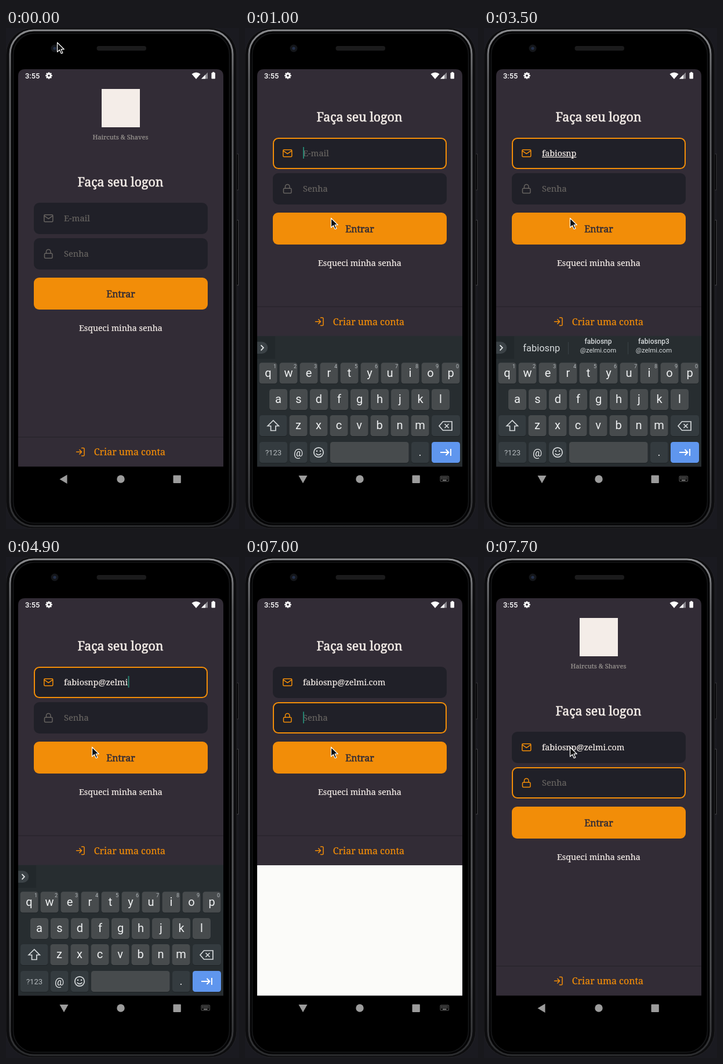
Write an HTML page that moves like this. It is 402x863 px and loops after 8 s.

```html
<!DOCTYPE html>
<html lang="pt-BR">
<head>
<meta charset="utf-8">
<title>Logon</title>
<style>
html, body { margin: 0; width: 100%; height: 100%; overflow: hidden; background: #1a1a20; }
svg { display: block; }
text { font-family: "Noto Serif", serif; fill: currentColor; color: #f4ede8; stroke: currentColor; stroke-width: .22px; white-space: pre; }
.sans, .sans text { font-family: Roboto, sans-serif; stroke: none; }
.mid { text-anchor: middle; }
.thick { stroke-width: .6px; }
.icon { fill: none; stroke-width: 2; stroke-linecap: round; stroke-linejoin: round; }
.hint { color: #666360; }
</style>
</head>
<body>
<svg id="stage" width="402" height="863" viewBox="0 0 402 863" xmlns="http://www.w3.org/2000/svg"></svg>
<script>
const LOOP = 8000;
const ORANGE = '#f28d08', GRAY = '#666360', FIELD = '#202028', BG = '#322c36';
const USER = 'fabiosnp', HOST = '@zelmi.com', MAIL = USER + HOST;

const rect = (x, y, w, h, rx, fill, more = '') =>
  `<rect x="${x}" y="${y}" width="${w}" height="${h}" rx="${rx}" fill="${fill}" ${more}/>`;
const text = (x, y, size, str, cls = '', more = '') =>
  `<text x="${x}" y="${y}" font-size="${size}" class="${cls}" ${more}>${str}</text>`;
const path = (d, more = '') => `<path d="${d}" ${more}/>`;
const icon = (id, cx, cy, color, body) =>
  `<g id="${id}" class="icon" stroke="${color}" transform="translate(${cx - 9} ${cy - 9}) scale(.75)">${body}</g>`;

function phone() {
  return `<defs>
    <linearGradient id="rim" x2="0" y2="1"><stop offset="0" stop-color="#8a8b8e"/><stop offset=".1" stop-color="#5c5d60"/><stop offset=".85" stop-color="#4c4d50"/><stop offset="1" stop-color="#2b2c2e"/></linearGradient>
    <clipPath id="screen"><path d="M21 755.5V83q0-12 12-12H363q12 0 12 12V755.5z"/></clipPath></defs>`
    + rect(0, 0, 402, 863, 0, '#1a1a20')
    + rect(396, 217, 5.5, 62, 1, '#0b0b0d', 'stroke="#3b3b3f"')
    + rect(396, 331, 5.5, 112, 1, '#0b0b0d', 'stroke="#4b4b4f"')
    + rect(0, 0, 398, 862, 46, '#0d0d0f', 'stroke="#222225"')
    + rect(7, 4, 384, 854, 41, '#050506', 'stroke="url(#rim)" stroke-width="3"')
    + rect(12.5, 9, 373, 844, 37, '#000', 'stroke="#17181a" stroke-width="1.5"')
    + '<circle cx="84" cy="35" r="6.5" fill="#14161a"/><circle cx="84" cy="35" r="2.6" fill="#232f49"/>'
    + rect(156.5, 31, 85.5, 8, 4, '#1b1b1c');
}

function statusBar() {
  const teeth = Array.from({ length: 8 }, (_, i) =>
    rect(72.7, 76.2, 2.6, 3, .4, '#fff', `transform="rotate(${i * 45} 74 82)"`)).join('');
  return text(33, 86.6, 12.8, '3:55', 'sans', 'font-weight="500" style="color:#fff"')
    + teeth + '<circle cx="74" cy="82" r="3.1" fill="none" stroke="#fff" stroke-width="2.5"/>'
    + path('M320.5 79.3Q328 73.5 335.5 79.3L328 88z', 'fill="#fff"')
    + path('M348 76.5V87.5H337z', 'fill="#8d8b91"')
    + path('M344 80.5V87.5H337z', 'fill="#fff"')
    + rect(354.5, 77, 6.5, 10.5, 1, '#fff') + rect(356.3, 75.8, 3, 2, 0, '#fff');
}

function form() {
  const mail = path('M4 4h16a2 2 0 0 1 2 2v12a2 2 0 0 1-2 2H4a2 2 0 0 1-2-2V6a2 2 0 0 1 2-2zM22 6l-10 7L2 6');
  const lock = path('M5 11h14a2 2 0 0 1 2 2v7a2 2 0 0 1-2 2H5a2 2 0 0 1-2-2v-7a2 2 0 0 1 2-2zM7 11V7a5 5 0 0 1 10 0v4');
  return '<g id="form">'
    + text(197.5, 273, 21.3, 'Faça seu logon', 'mid thick')
    + rect(49, 302, 298, 52, 8.5, FIELD, 'id="mailBox" stroke-width="2"')
    + icon('mailIcon', 73.3, 327.8, GRAY, mail)
    + text(100, 332.6, 14.6, 'E-mail', 'hint', 'id="mailHint"')
    + text(100, 332.6, 14.3, '', '', 'id="mail"')
    + rect(100, 334, 0, 1.1, 0, '#f4ede8', 'id="underline"')
    + rect(49, 363, 298, 52, 8.5, FIELD, 'id="passBox" stroke-width="2"')
    + icon('passIcon', 73.2, 389, GRAY, lock)
    + text(100, 394, 14.6, 'Senha', 'hint')
    + rect(100, 317, 2, 20, 0, '#25806f', 'id="caret"')
    + rect(48, 430, 300, 55, 9, ORANGE)
    + text(198, 463.6, 15.9, 'Entrar', 'mid thick', `style="color:${BG}"`)
    + text(197.8, 521.5, 14.2, 'Esqueci minha senha', 'mid')
    + '</g>';
}

function footer() {
  return '<g id="footer">' + rect(21, 704, 354, 1.2, 0, '#27232b')
    + icon('enter', 128.3, 730.3, ORANGE,
      path('M15 3h4a2 2 0 0 1 2 2v14a2 2 0 0 1-2 2h-4M10 17l5-5-5-5M15 12H3'))
    + text(151.8, 736, 15.95, 'Criar uma conta', '', `style="color:${ORANGE}"`) + '</g>';
}

function keyboard() {
  const KEY = '#474b4d', SPECIAL = '#343b3f', INK = 'style="color:#eef0f1"', DIM = 'style="color:#b4babd"';
  const rows = [['qwertyuiop', 40, 576.5], ['asdfghjkl', 57.5, 622], ['zxcvbnm', 92, 667]];
  const key = (x, y, w, fill) => rect(x, y + 1, w, 36, 4.5, '#1e2326') + rect(x, y, w, 36, 4.5, fill);
  let s = rect(21, 530.5, 354, 225, 0, '#272d30') + rect(21, 531, 31, 39, 0, '#22282b')
    + path('M21 540.5h8a10.3 10.3 0 0 1 0 20.6h-8z', 'fill="#3b4246"')
    + path('M27.5 546.3l4.3 4.5-4.3 4.5', 'fill="none" stroke="#e6e9ea" stroke-width="1.8"');
  rows.forEach(([chars, x0, y], r) => [...chars].forEach((c, i) => {
    const x = x0 + i * 35;
    s += key(x - 15.5, y, 31, KEY) + text(x, y + 24, 20, c, 'mid', INK);
    if (!r) s += text(x + 11.5, y + 9.6, 9, (i + 1) % 10, 'mid', DIM);
  }));
  s += key(25, 667, 47.5, SPECIAL) + key(322, 667, 49, SPECIAL);
  s += [[25, 48], [77, 30.5], [112, 30.5], [147, 135.5], [287, 30.5], [322, 49]]
    .map(([x, w], i) => key(x, 713, w, i == 3 ? KEY : i == 5 ? '#5f96ee' : SPECIAL)).join('');
  const line = 'fill="none" stroke="#d5d9db" stroke-width="1.7"';
  return '<g id="keys" class="sans" clip-path="url(#screen)"><g id="slide">' + s
    + path('M48.7 676l-9.5 9.5h5.3v8h8.4v-8h5.3z', line)
    + path('M341.5 678h15.5v15h-15.5l-6.5-7.5zM344.5 682l7 7m0-7l-7 7', line)
    + text(49, 736, 13, '?123', 'mid', DIM) + text(92, 737.5, 18, '@', 'mid', INK)
    + `<circle cx="127" cy="731" r="8.2" ${line}/>`
    + '<circle cx="124" cy="728.7" r="1.3" fill="#d5d9db"/><circle cx="130" cy="728.7" r="1.3" fill="#d5d9db"/>'
    + path('M122.5 733q4.5 4.8 9 0', line)
    + text(302, 737, 19, '.', 'mid', INK)
    + path('M337 731h14M346.5 726l5 5-5 5M355 725v12', 'fill="none" stroke="#fff" stroke-width="1.9"')
    + '<g id="strip">' + rect(145, 541, 1, 21, 0, '#3a4145') + rect(248, 541, 1, 21, 0, '#3a4145')
    + [[197, ''], [293, '3']].map(([x, n]) =>
      text(x, 544, 12, USER + n, 'mid', 'font-weight="500" style="color:#d6dadc"')
      + text(x, 559, 11.3, HOST, 'mid', 'style="color:#d6dadc"')).join('')
    + '</g>' + text(99.3, 557, 16.4, '', 'mid', 'id="word" style="color:#d6dadc"')
    + '</g></g>';
}

function navBar() {
  const c = '#9c9c9c';
  const dots = Array.from({ length: 10 }, (_, i) =>
    rect(338.5 + i % 5 * 2.4, 773.5 + Math.floor(i / 5) * 2.4, 1.4, 1.4, 0, c)).join('');
  return path('M92.5 777.2L105.5 769.5V785z', `id="back" fill="${c}"`)
    + `<circle cx="198" cy="777" r="6.7" fill="${c}"/>` + rect(288.5, 770.5, 13.3, 13.5, 1, c)
    + '<g id="openNav">' + path('M92.5 771H107.5L100 784.3z', `fill="${c}"`)
    + rect(337, 772, 14.5, 9, 1, 'none', `stroke="${c}" stroke-width=".6"`) + dots
    + rect(341, 778.4, 6.5, 1.4, 0, c) + '</g>';
}

const stage = document.getElementById('stage');
stage.innerHTML = phone()
  + '<g clip-path="url(#screen)">' + rect(21, 71, 354, 685, 0, BG) + statusBar()
  + '<g id="brand">' + rect(165, 105, 66, 66, 0, '#f4ede8')
  + text(197.5, 192, 11.1, 'Haircuts &amp; Shaves', 'mid', 'style="color:#999591"') + '</g>'
  + form() + footer() + rect(21, 531, 354, 225, 0, '#fbfbf9', 'id="blank"') + '</g>'
  + keyboard() + navBar()
  + path('M0 0V16.3l3.9-3.6 2.9 6.3 2.6-1.1-2.8-6.2h5.2z',
    'id="mouse" fill="#111" stroke="#fff" stroke-width="1.2" stroke-linejoin="round"');

const ui = {};
stage.querySelectorAll('[id]').forEach(n => ui[n.id] = n);
const set = (n, k, v) => n.setAttribute(k, v);
const show = (n, on) => set(n, 'visibility', on ? 'visible' : 'hidden');
const move = (n, x, y) => set(n, 'transform', `translate(${x} ${y})`);

// [time, changes]; each step keeps what it does not change
const STEPS = [
  [0, { x: 88.5, y: 25, typed: 0, word: 0, focus: '', caret: 0, compact: 0, keys: 0, slide: 0, nav: 0 }],
  [100, { x: 122, y: 52 }], [200, { x: 204, y: 128 }], [300, { x: 276, y: 232 }],
  [400, { x: 240, y: 296 }], [500, { x: 172, y: 324 }], [600, { x: 148.5, y: 327.5 }],
  [800, { caret: 1 }],
  [900, { focus: 'mail', keys: 1, slide: 110, nav: 1 }],
  [1000, { compact: 1, slide: 0 }],
  [1500, { caret: 0 }], [1600, { typed: 1, caret: 1 }],
  [1800, { typed: 2 }], [1900, { typed: 3, word: 1 }],
  [2100, { typed: 4, word: 3 }], [2300, { typed: 6, word: 5 }],
  [2500, { typed: 7 }], [2600, { word: 6 }],
  [2900, { typed: 8 }], [3000, { word: 8 }],
  [3500, { caret: 0 }], [3800, { typed: 9, caret: 1 }], [4000, { word: 0 }],
  [4200, { typed: 10 }], [4400, { typed: 11 }], [4700, { typed: 13 }], [4900, { typed: 14 }],
  [5100, { typed: 15 }], [5200, { typed: 16 }], [5400, { typed: 17 }], [5600, { typed: 18 }],
  [6100, { caret: 0 }], [6600, { caret: 1 }],
  [7000, { focus: 'pass', keys: 0 }],
  [7100, { compact: 0 }], [7200, { nav: 0 }], [7700, { caret: 0 }]
];

function draw(s) {
  const onPass = s.focus == 'pass';
  move(ui.mouse, s.x, s.y);
  move(ui.form, 0, s.compact ? -112 : 0);
  move(ui.footer, 0, s.compact ? -224.5 : 0);
  show(ui.brand, !s.compact);
  show(ui.blank, s.compact && !s.keys);
  show(ui.keys, s.keys);
  move(ui.slide, 0, s.slide);
  show(ui.back, !s.nav);
  show(ui.openNav, s.nav);

  ui.mail.textContent = MAIL.slice(0, s.typed);
  show(ui.mailHint, !s.typed);
  const width = s.typed ? ui.mail.getComputedTextLength() : 0;
  const composing = s.typed && (s.word || s.typed < USER.length);
  set(ui.underline, 'width', composing ? Math.min(width, 60) : 0);

  set(ui.mailBox, 'stroke', s.focus == 'mail' ? ORANGE : FIELD);
  set(ui.passBox, 'stroke', onPass ? ORANGE : FIELD);
  set(ui.mailIcon, 'stroke', s.focus == 'mail' || s.typed ? ORANGE : GRAY);
  set(ui.passIcon, 'stroke', onPass ? ORANGE : GRAY);
  show(ui.caret, s.caret);
  set(ui.caret, 'x', onPass || !s.typed ? 100 : 100.5 + width);
  set(ui.caret, 'y', onPass ? 378.5 : 317);

  ui.word.textContent = USER.slice(0, s.word);
  set(ui.word, 'x', s.word == 1 ? 198 : 99.3);
  set(ui.strip, 'display', s.word > 1 ? 'inline' : 'none');
}

let last = -1;
function tick() {
  const t = performance.now() % LOOP;
  const at = STEPS.findLastIndex(([time]) => time <= t);
  if (at != last) {
    draw(Object.assign({}, ...STEPS.slice(0, at + 1).map(step => step[1])));
    last = at;
  }
  requestAnimationFrame(tick);
}
tick();
</script>
</body>
</html>
```
